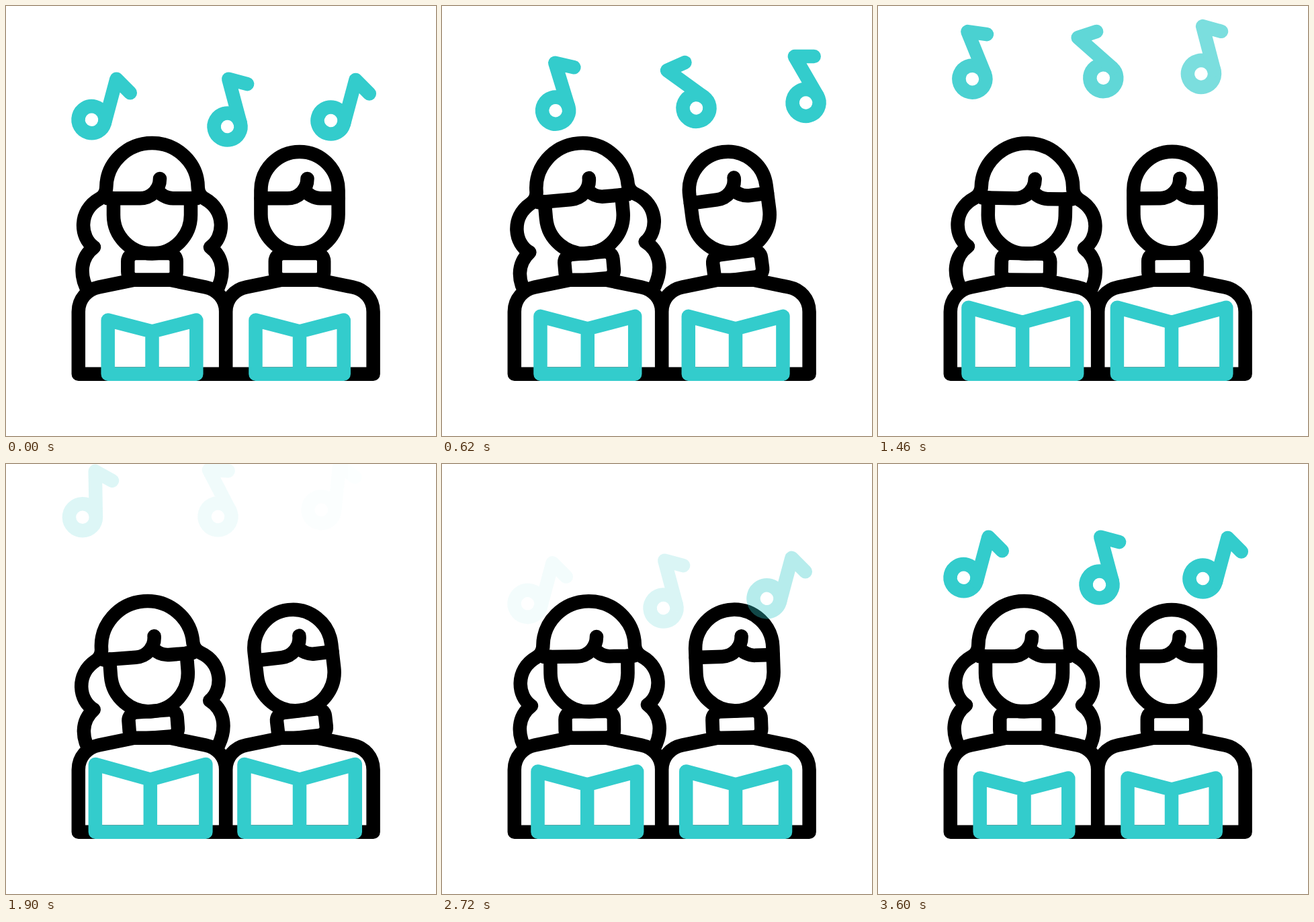
Write an HTML page that moves like this. It is 640 px wide and 640 px high and loops after 3620 ms.

```html
<!DOCTYPE html>
<html lang="en">
<head>
<meta charset="utf-8">
<title>Choir</title>
<style>
  html, body { margin: 0; width: 100%; height: 100%; overflow: hidden; background: #fff; }
  svg { display: block; width: 100%; height: 100%; }
  .ink, .teal { fill: none; stroke: #000; stroke-width: 20.5; stroke-linecap: round; stroke-linejoin: round; }
  .teal { stroke: #33cccc; }
</style>
</head>
<body>
<svg viewBox="0 0 640 640">
  <defs>
    <path id="body" fill="#fff" d="M107.8 547.7V455C107.8 436 121 422 138 418.5L190.5 407.8H244.5L297 418.5C314 422 327.2 436 327.2 455V547.7Z"/>
    <rect id="neck" x="181.3" y="368" width="72.4" height="39.8" rx="12"/>
    <path id="fringe" d="M160 286.3H199.5C215.8 286.3 229 273.3 229 257M224 273C230 281 239 286.3 248.5 286.3H275"/>
  </defs>
  <g class="ink">
    <g id="woman">
      <use href="#neck"/>
      <path d="M123 426C108 400 111 374 131 359C110 345 107 305 139 287C146 283 148.7 277 149.2 271C149.2 234 180 204 217.5 204C255 204 285.8 234 285.8 271C286.3 277 289 283 296 287C328 305 325 345 304 359C324 374 327 400 312 426"/>
      <path d="M160 286V311A57.5 57.5 0 0 0 275 311V286M151 286.3H160M275 286.3H284"/>
      <use href="#fringe"/>
    </g>
    <g id="man">
      <use href="#neck" x="219.5"/>
      <path d="M379.4 310V274.5A57.6 57.6 0 0 1 494.6 274.5V310A57.6 57.6 0 0 1 379.4 310Z"/>
      <use href="#fringe" x="219.5"/>
    </g>
    <use href="#body"/>
    <use href="#body" x="219.4"/>
  </g>
  <g class="teal">
    <path id="book1"/>
    <path id="book2"/>
    <g id="notes"></g>
  </g>
</svg>
<script>
const LOOP = 3620;
const $ = id => document.getElementById(id);
const clamp = u => Math.min(1, Math.max(0, u));
const ease = (t, a, b) => { const u = clamp((t - a) / (b - a)); return u * u * (3 - 2 * u); };
const mix = (a, b, u) => a + (b - a) * u;

// Smooth curve through [time, x, y] points, at rest at the first one
function along(keys, t) {
  const n = keys.length - 1;
  if (t <= keys[0][0]) return keys[0].slice(1);
  if (t >= keys[n][0]) return keys[n].slice(1);
  let i = 0;
  while (t > keys[i + 1][0]) i++;
  const a = keys[i], b = keys[i + 1], d = b[0] - a[0], u = (t - a[0]) / d;
  const slope = (j, c) => {
    if (j === 0) return 0;
    const p = keys[j - 1], q = keys[Math.min(n, j + 1)];
    return (q[c] - p[c]) / (q[0] - p[0]);
  };
  return [1, 2].map(c => {
    const h = u * u * (3 - 2 * u);
    return mix(a[c], b[c], h)
      + d * u * (1 - u) * ((1 - u) * slope(i, c) - u * slope(i + 1, c));
  });
}

const DRIFT = [
  [0, 0, 0], [460, 41.5, -13.5], [540, 51.3, -20], [620, 58, -26.5], [800, 62.5, -39.5],
  [960, 53.5, -49], [1090, 40.5, -53.5], [1300, 13, -60.5], [1460, -2.5, -69.5],
  [1620, -10.5, -81], [1820, -14.5, -96], [2000, -13, -110]
];
const LIFT = [[0, 0, 0], [540, -2.4, -7.5], [880, 0.6, -11], [1380, 1.5, -7.7], [2000, 0, -4]];

const notes = [
  { x: 127.5, y: 169.2, turn: 15, delay: 160 },
  { x: 329.5, y: 179.5, turn: -15, delay: 80, extra: LIFT },
  { x: 483.5, y: 170.5, turn: 15, delay: 0 }
];
for (const n of notes) {
  n.el = document.createElementNS("http://www.w3.org/2000/svg", "g");
  n.el.innerHTML = '<circle r="20"/><path d="M20 0V-68L45 -53.5"/>';
  $("notes").append(n.el);
}

function drawNote(n, time) {
  const t = time - n.delay;
  let { x, y, turn } = n, alpha;
  if (t < 2300) {
    const [dx, dy] = along(DRIFT, t);
    const [ex, ey] = n.extra ? along(n.extra, t) : [0, 0];
    x += dx + ex;
    y += dy + ey;
    turn -= 50.5 * (ease(t, 0, 780) - ease(t, 780, 2320));
    alpha = 1 - ease(t, 1130, 1950);
  } else {
    y += 40 * (1 - ease(t, 2480, 3210));
    alpha = ease(t, 2480, 3080);
  }
  n.el.setAttribute("transform", `translate(${x} ${y}) rotate(${turn})`);
  n.el.setAttribute("opacity", alpha);
}

// Six swings of 600 ms between poses [turn, dx, dy]: rest, left, right, left, right, left, rest
function drawHead(id, t, px, py, left, right) {
  const rest = [0, 0, 0], stops = [rest, left, right, left, right, left, rest];
  const i = Math.min(5, Math.floor(t / 600));
  const u = ease(t, i * 600, i * 600 + 600);
  const [turn, dx, dy] = rest.map((_, c) => mix(stops[i][c], stops[i + 1][c], u));
  $(id).setAttribute("transform", `translate(${dx} ${dy}) rotate(${turn} ${px} ${py})`);
}

function drawBook(id, l, m, r, k) {
  const top = 467.5 - 20.7 * k, fold = 484.5 - 15 * k, base = 547.7;
  $(id).setAttribute("d", `M${l} ${top}L${m} ${fold}L${r} ${top}V${base}H${l}ZM${m} ${fold}V${base}`);
}

function draw(t) {
  drawHead("woman", t, 217.5, 368, [-5.2, -0.2, -0.3], [5.2, 4.8, 0.7]);
  drawHead("man", t, 437, 366, [-7.5, 0.3, -0.9], [4.6, 2, 0.3]);
  const k = ease(t, 0, 1800) - ease(t, 1800, 3600);
  drawBook("book1", 151.7 - 19 * k, 217.5 - 2.7 * k, 283.3 + 14.2 * k, k);
  drawBook("book2", 371.5 - 17.2 * k, 437, 502.7 + 17.2 * k, k);
  for (const n of notes) drawNote(n, t);
}

const start = performance.now();
function tick() {
  draw((performance.now() - start) % LOOP);
  requestAnimationFrame(tick);
}
tick();
</script>
</body>
</html>
```
